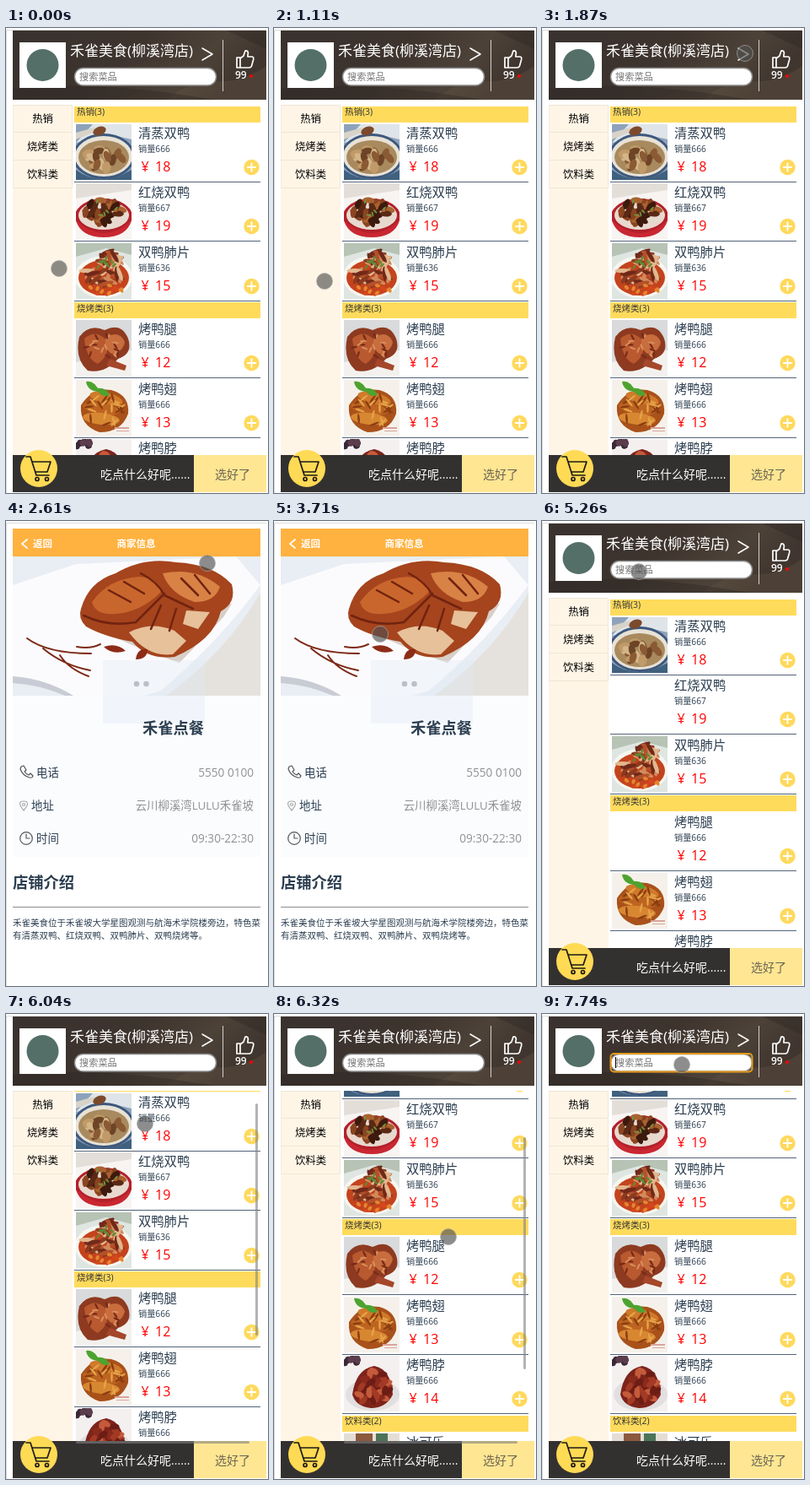
An HTML page for the animation above (8 s loop, 311 by 551 pixels).

```html
<!DOCTYPE html>
<html lang="zh-CN">
<head>
<meta charset="utf-8">
<title>点餐</title>
<style>
html, body { margin: 0; width: 100%; height: 100%; overflow: hidden; background: #fff; }
svg { display: block; }
text { font-family: "Open Sans", "Noto Sans CJK SC", "Noto Sans CJK", sans-serif; fill: #2c3e50; }
.white { fill: #fff; }
.mid { text-anchor: middle; }
.end { text-anchor: end; fill: #919191; font-weight: 500; }
.side { font-size: 12.3px; fill: #000; text-anchor: middle; }
.cat { font-size: 10.5px; fill: #333; }
.dish { font-size: 15.3px; }
.sold { font-size: 10.2px; }
.price { font-size: 16px; fill: #f00; }
.row text { font-size: 13.4px; }
.line { fill: none; stroke-linecap: round; stroke-linejoin: round; }

#cursor, #list, #thumb, #bars, #info, #photo, #status, #focus, .food {
  animation: 8s step-end infinite;
}
#cursor { animation-name: point; }
#list { animation-name: scroll; }
#thumb { animation-name: thumb; }
#bars { animation-name: bars; }
#info { animation-name: info; }
#photo { animation-name: photo; }
#status { animation-name: status; }
#focus { animation-name: focus; }
.food:nth-of-type(1) { animation-name: none; }

@keyframes point {
  0% { transform: translate(63px, 285px); }
  1.5% { transform: translate(25px, 308px); }
  3% { transform: translate(32px, 332px); }
  13.875% { transform: translate(60px, 300px); }
  15.75% { transform: translate(120px, 210px); }
  17.625% { transform: translate(185px, 110px); }
  19.5% { transform: translate(228px, 45px); }
  21.375% { transform: translate(240px, 11px); }
  23.375% { transform: translate(241px, 30px); }
  32.625% { transform: translate(239px, 50px); }
  34.375% { transform: translate(222px, 85px); }
  36.125% { transform: translate(196px, 114px); }
  37.875% { transform: translate(165px, 128px); }
  39.5% { transform: translate(140px, 133px); }
  46.375% { transform: translate(126px, 134px); }
  47.875% { transform: translate(95px, 106px); }
  49.75% { transform: translate(66px, 73px); }
  51.375% { transform: translate(45px, 45px); }
  53.25% { transform: translate(31px, 28px); }
  55.5% { transform: translate(30px, 26px); }
  60.875% { transform: translate(35px, 29px); }
  62.5% { transform: translate(58px, 41px); }
  64.125% { transform: translate(90px, 53px); }
  65.75% { transform: translate(115px, 60px); }
  67.625% { transform: translate(125px, 61px); }
  69.125% { transform: translate(131px, 60px); }
  70.625% { transform: translate(134px, 58px); }
  74% { transform: translate(165px, 130px); }
  75.75% { transform: translate(190px, 200px); }
  77.375% { transform: translate(203px, 245px); }
  79% { transform: translate(207px, 264px); }
  84.375% { transform: translate(206px, 240px); }
  86.125% { transform: translate(202px, 200px); }
  87.875% { transform: translate(196px, 160px); }
  89.625% { transform: translate(188px, 122px); }
  91.375% { transform: translate(180px, 92px); }
  93.125% { transform: translate(173px, 74px); }
  95% { transform: translate(168px, 64px); }
  96.75%, 100% { transform: translate(166px, 60px); }
}
@keyframes scroll {
  0% { transform: translateY(0); }
  74% { transform: translateY(-20px); }
  75.75% { transform: translateY(-50px); }
  77.375% { transform: translateY(-72px); }
  79%, 100% { transform: translateY(-82px); }
}
@keyframes thumb {
  0% { transform: translateY(0); }
  74% { transform: translateY(13px); }
  75.75% { transform: translateY(32px); }
  77.375% { transform: translateY(47px); }
  79%, 100% { transform: translateY(53px); }
}
@keyframes bars {
  0% { opacity: 0; }
  55.5% { opacity: 1; }
  62.5% { opacity: .5; }
  64.125% { opacity: 0; }
  74% { opacity: 1; }
  86.125% { opacity: .5; }
  87.875%, 100% { opacity: 0; }
}
@keyframes info { 0% { opacity: 0; } 28.875% { opacity: 1; } 55.5%, 100% { opacity: 0; } }
@keyframes photo { 0% { opacity: 0; } 32.625%, 100% { opacity: 1; } }
@keyframes status { 0% { opacity: 0; } 55.5% { opacity: 1; } 62.5%, 100% { opacity: 0; } }
@keyframes focus { 0% { opacity: 0; } 95%, 100% { opacity: 1; } }
@keyframes load0 { 0% { opacity: 1; } 55.5% { opacity: 0; } 60.875%, 100% { opacity: 1; } }
@keyframes load1 { 0% { opacity: 1; } 55.5% { opacity: 0; } 67.625%, 100% { opacity: 1; } }
@keyframes load2 { 0% { opacity: 1; } 55.5% { opacity: 0; } 62.5%, 100% { opacity: 1; } }
@keyframes load3 { 0% { opacity: 1; } 55.5% { opacity: 0; } 69.125%, 100% { opacity: 1; } }
@keyframes load4 { 0% { opacity: 1; } 55.5% { opacity: 0; } 64.125%, 100% { opacity: 1; } }
@keyframes load5 { 0% { opacity: 1; } 55.5% { opacity: 0; } 70.625%, 100% { opacity: 1; } }
</style>
</head>
<body>
<svg width="311" height="551" viewBox="0 0 311 551">
  <defs>
    <linearGradient id="wood" x2="1" y2=".25">
      <stop offset="0" stop-color="#39322f"/>
      <stop offset=".5" stop-color="#3e342e"/>
      <stop offset=".8" stop-color="#4d4238"/>
      <stop offset="1" stop-color="#40362f"/>
    </linearGradient>
    <clipPath id="listBox"><path d="M80 91h223v415H80z"/></clipPath>
    <clipPath id="foodBox"><path d="M0 0h66v66H0z"/></clipPath>
    <clipPath id="photoBox"><path d="M8 42h294v165H8z"/></clipPath>
    <clipPath id="headBox"><path d="M8 3h301v82H8z"/></clipPath>
  </defs>

  <!-- menu page -->
  <g clip-path="url(#headBox)">
    <path fill="url(#wood)" d="M8 3h301v82H8z"/>
    <path fill="#6a5a4b" opacity=".3" d="M190 85q30-24 60-22t59-18v40z"/>
    <path fill="#2a2421" opacity=".35" d="M8 72q80-8 180 4l60 9H8zM262 3h47v22z"/>
  </g>
  <path fill="#fff" d="M16 17h55v54H16z"/>
  <circle cx="43.500" cy="44" r="19" fill="#536f68"/>
  <text class="white" x="76" y="33" font-size="17">禾雀美食(柳溪湾店)</text>
  <path class="line" stroke="#fff" stroke-width="1.500" d="M233 24l12 7-12 7"/>
  <rect x="81.500" y="47.500" width="168" height="20.500" rx="10" fill="#fff" stroke="#8b8b8b" stroke-width="1.500"/>
  <text x="87" y="61.500" font-size="11.200" style="fill:#757575">搜索菜品</text>
  <g id="focus">
    <rect x="81.500" y="47" width="168" height="21.500" rx="4" fill="none" stroke="#e59a1c" stroke-width="2"/>
    <path stroke="#000" d="M87.500 51v13"/>
  </g>
  <path stroke="#d5d0cc" d="M257.500 14v61"/>
  <path class="line" stroke="#fff" stroke-width="1.700" d="M274 35h4v12h-4zM278 36l4-3 2-6c3-1 4 2 3 5v2h5c2 0 2 2 1.500 4l-2 7c-.500 1.500-1.500 2-3 2H278"/>
  <text class="white" x="272" y="60" font-size="12" font-weight="600">99</text>
  <circle cx="291" cy="57" r="2" fill="#f00"/>

  <path fill="#fff5e6" d="M8 91h71v415H8z"/>
  <path class="line" stroke="#efe6d6" d="M8.500 91.500h70v32h-70zM8.500 123.500h70v33h-70zM8.500 156.500h70v33h-70z"/>
  <text class="side" x="43.500" y="111.500">热销</text>
  <text class="side" x="43.500" y="144.500">烧烤类</text>
  <text class="side" x="43.500" y="177.500">饮料类</text>
  <g clip-path="url(#listBox)"><g id="list"></g></g>

  <path fill="#333130" d="M8 506h215v44H8z"/>
  <path fill="#ffe692" d="M223 506h86v44h-86z"/>
  <circle cx="39" cy="522" r="22" fill="#ffda55"/>
  <g class="line" stroke="#1d1a14" stroke-width="1.700">
    <path d="M24 508h5l7 22h15M31 514h22l-4 12H35"/>
    <circle cx="37" cy="534.500" r="2"/><circle cx="48.500" cy="534.500" r="2"/>
  </g>
  <text class="white" x="112" y="534" font-size="14" font-weight="500">吃点什么好呢......</text>
  <text x="248" y="534" font-size="14" style="fill:#6c6454">选好了</text>
  <g id="bars" fill="#808080" fill-opacity=".6">
    <rect id="thumb" x="296" y="93" width="3" height="275" rx="1.500"/>
    <rect x="83" y="506" width="206" height="3" rx="1.500"/>
  </g>

  <!-- shop page -->
  <g id="info">
    <path fill="#fff" d="M0 0h311v551H0z"/>
    <path fill="#ffb240" d="M8 9h294v33H8z"/>
    <path class="line" stroke="#fff" stroke-width="1.700" d="M25 22l-6 5 6 5"/>
    <text class="white" x="32" y="30.500" font-size="11.500" font-weight="600">返回</text>
    <text class="white mid" x="154.500" y="30.500" font-size="11.500" font-weight="600">商家信息</text>
    <g id="photo">
      <path fill="#fafcfe" d="M8 207h294v191H8z"/>
      <g clip-path="url(#photoBox)">
        <path fill="#e9edf4" d="M8 42h294v165H8z"/>
        <path fill="#e4dfd4" opacity=".7" d="M302 85v122H190q70-50 112-122z"/>
        <path fill="#fbfbfd" d="M8 76l75-25 190-9 29 34q-50 68-118 125l-20 6H78Q30 188 8 184z"/>
        <path fill="#c9ccd4" d="M8 184q40 3 72 23H70Q40 194 8 192z"/>
        <path fill="#d8cfc9" d="M96 122q60 30 110 46l52-54 10-16z"/>
        <path fill="#a5441d" d="M89 104Q98 72 130 62q34-20 72-13 44 2 66 26 6 22-13 32-8 34-55 54-32 4-50-18-34-6-55-18-10-10-6-21z"/>
        <path fill="#c9662d" d="M102 96q20-28 56-30 24 2 26 18-24 24-54 26-24 2-28-14z"/>
        <path fill="#d98245" d="M186 62q40-8 68 16-6 18-30 18-30-10-38-34z"/>
        <path fill="#e6c19a" d="M146 132q26-14 54-2l14 12-16 16q-30 4-52-26zM214 106l28 2-14 20-18-6z"/>
        <g class="line" stroke="#71230f" stroke-width="2.500">
          <path d="M92 112q30 14 62 8l34-34M160 62q20 10 28 26l34 16M122 82l26 14M140 72l24 14M208 68l20 20M224 64l18 22M184 100l-12 28M202 104l-8 26"/>
        </g>
        <g class="line" stroke="#7d2a17" stroke-width="2">
          <path d="M25 139q24 18 76 18M44 151q24 20 56 26M64 159q10 16 34 25M84 149q16 3 28-3"/>
        </g>
        <path fill="#8d2c17" d="M116 149q16-5 26 5-16 5-26-5zM154 164q2-14 14-12 0 12-14 12z"/>
        <g fill="#a8a9ad"><circle cx="155" cy="193" r="3.300"/><circle cx="166.500" cy="193" r="3.300"/></g>
      </g>
      <path fill="#dfe8f2" opacity=".35" d="M115 165h121v75H115z"/>
    </g>
    <text x="162" y="251.500" font-size="18.300" font-weight="700">禾雀点餐</text>
    <g class="line" stroke="#555" stroke-width="1.200">
      <path d="M18 291l3-1 3 5-2 2q2 3 5 4l2-2 3 3q-1 3-4 2-8-2-11-10z"/>
      <path stroke="#aaa" d="M21 343q-9-11 0-11t0 11z"/><circle stroke="#aaa" cx="21" cy="336" r="1.500"/>
      <circle cx="24" cy="376" r="7.300"/><path d="M24 371v5h4"/>
    </g>
    <g class="row">
      <text x="36" y="302.500">电话</text><text class="end" x="294" y="303" style="font-size:13.600px">5550 0100</text>
      <text x="30" y="342">地址</text><text class="end" x="294" y="342">云川柳溪湾LULU禾雀坡</text>
      <text x="36" y="381">时间</text><text class="end" x="294" y="381" style="font-size:13.600px">09:30-22:30</text>
    </g>
    <text x="8" y="434.500" font-size="18.300" font-weight="700">店铺介绍</text>
    <path stroke="#8c8c8c" d="M8 457.500h294"/>
    <text font-size="10.500"><tspan x="8" y="480">禾雀美食位于禾雀坡大学星图观测与航海术学院楼旁边，特色菜</tspan><tspan x="8" y="494.500">有清蒸双鸭、红烧双鸭、双鸭肺片、双鸭烧烤等。</tspan></text>
  </g>

  <path fill="none" stroke="#dcdcdc" d="M.5 551V2.500H309"/>
  <g id="status">
    <path fill="#f2f3f5" stroke="#d4d6d9" stroke-width=".5" d="M1 550v-21h97q3 0 3 3v18z"/>
    <text x="4" y="544" font-size="12" style="fill:#5a5d61">正在连接...</text>
  </g>
  <circle id="cursor" r="9.500" fill="#505050" fill-opacity=".65" stroke="#aaa" stroke-opacity=".7"/>
</svg>
<script>
let seed = 1;
const rnd = () => (seed = seed * 16807 % 2147483647) / 2147483647;
const path = (fill, d) => `<path fill="${fill}" d="${d}"/>`;
const oval = (fill, x, y, rx, ry, turn = 0) =>
  `<ellipse fill="${fill}" rx="${rx}" ry="${ry}" transform="translate(${x} ${y}) rotate(${turn})"/>`;

// scattered bits inside an ellipse
function bits(start, n, x, y, rx, ry, long, thin, colors) {
  seed = start;
  let out = '';
  for (let i = 0; i < n; i++) {
    const a = rnd() * 6.283, r = Math.sqrt(rnd());
    out += oval(colors[i % colors.length], (x + rx * r * Math.cos(a)).toFixed(1),
      (y + ry * r * Math.sin(a)).toFixed(1), long, thin, Math.round(rnd() * 180));
  }
  return out;
}
const back = fill => path(fill, 'M0 0h66v66H0z');

const foods = [
  back('#8ea3bb') + path('#dfe4e8', 'M0 22L20 0h46v18L40 12z') + oval('#3d587d', 33, 38, 37, 27) +
    oval('#e8e2d6', 33, 38, 34, 24) + oval('#a88a5e', 33, 39, 30, 20) +
    bits(7, 22, 33, 40, 22, 13, 7, 4, ['#8a5a34', '#c09a68', '#6d4426', '#d3b588']) +
    path('#40617f', 'M0 54q30 22 66 0v12H0z') + oval('#7c4a2b', 28, 8, 8, 5, -20) + path('#d8d3c8', 'M0 10l22-6-2 6L0 18z'),
  back('#f7f4f2') + path('#e4ded9', 'M0 0h66v8L0 18z') + oval('#b3202a', 33, 39, 34, 21) + oval('#e8d9cf', 33, 38, 30, 17) +
    bits(31, 36, 33, 33, 22, 14, 7, 3.5, ['#5a2915', '#8a4420', '#3d1a0e', '#a9622f']) +
    bits(5, 5, 33, 30, 18, 10, 3, 1, ['#6f9440']) + path('#c92731', 'M0 44q33 30 66 0-6 20-33 20T0 44z'),
  back('#dfe6e2') + path('#b7c3b5', 'M0 0h66v14L36 6 0 16z') + oval('#f7f6f0', 33, 40, 34, 25) + oval('#c4431d', 33, 41, 30, 21) +
    bits(19, 46, 33, 32, 21, 22, 9, 2.5, ['#8c3a1f', '#d08a5c', '#b4512a', '#e2b78e', '#70291a']) +
    bits(3, 8, 34, 22, 14, 12, 3, 1.3, ['#5f8c36']) + bits(11, 14, 33, 54, 24, 7, 3, 2, ['#d6471c', '#e5862f']),
  back('#d9dadb') + path('#f3f1ee', 'M0 50l66-14v30H0z') +
    path('#8e3a20', 'M4 20Q16 4 34 12q20-10 28 10 6 18-12 24-16 18-36 14-16-14-10-40z') +
    path('#b9592f', 'M10 22q14-12 26 2 6 16-10 28-14-6-16-30z') + path('#c86d3e', 'M36 20q16-8 22 6-2 12-16 14-10-8-6-20z') +
    bits(23, 18, 32, 32, 22, 18, 4, 1.2, ['#d98c5a', '#772a18']) + path('#a5472a', 'M40 46l20 8-2 6-22-6z'),
  back('#f5f1ea') + path('#a9511a', 'M6 30Q20 8 42 12q22 6 20 28-8 22-34 22Q4 54 6 30z') +
    oval('#d07a2a', 36, 22, 20, 7, 14) + oval('#bd6420', 30, 34, 22, 7, 10) + oval('#d88731', 30, 46, 22, 7, 6) +
    bits(13, 22, 33, 36, 22, 18, 6, 1.3, ['#8b3d12', '#e5a34a']) + path('#4da32f', 'M12 2q10-2 16 12-14 0-16-12zM24 10q12-2 16 8-10 4-16-8z') +
    path('#d9a49b', 'M46 56h17v2H46zM48 60h15v1H48z'),
  back('#f3f0ef') + bits(17, 9, 9, 5, 11, 5, 4, 4, ['#3a2836', '#5b3d4d']) + oval('#e2dfe0', 34, 46, 32, 19) +
    path('#7d231a', 'M10 46Q14 16 36 12q20 4 22 34-8 16-26 16-18-2-22-16z') +
    bits(29, 38, 34, 37, 20, 20, 6, 3.5, ['#a33a25', '#6c1d15', '#c45b3b', '#8a2a1d']),
  back('#e4ddd5') + path('#8b5a3e', 'M14 0h20v66H14z') + path('#4c7458', 'M38 0h14v66H38z')
];

const menu = [
  ['热销(3)', ['清蒸双鸭', 666, 18], ['红烧双鸭', 667, 19], ['双鸭肺片', 636, 15]],
  ['烧烤类(3)', ['烤鸭腿', 666, 12], ['烤鸭翅', 666, 13], ['烤鸭脖', 666, 14]],
  ['饮料类(2)', ['冰可乐', 666, 3]]
];

let top0 = 91, n = 0, html = '';
for (const [title, ...dishes] of menu) {
  html += path('#ffdb5c', `M81 ${Math.round(top0 + 2)}h221v19H81z`) +
    `<text class="cat" x="84" y="${top0 + 12.4}">${title}</text>`;
  top0 += 21.2;
  for (const [name, sold, price] of dishes) {
    const y = Math.floor(top0);
    html += `<g transform="translate(83 ${y + 2})"><g class="food" clip-path="url(#foodBox)" style="animation-name:load${Math.min(n, 5)}">${foods[n]}</g></g>
      <text class="dish" x="157" y="${y + 18.4}">${name}</text>
      <text class="sold" x="157" y="${y + 35.2}">销量${sold}</text>
      <text class="price" x="160.500" y="${y + 58}">¥</text><text class="price" x="177" y="${y + 58}">${price}</text>
      <circle cx="291.500" cy="${y + 53}" r="9.200" fill="#ffd95c"/>
      <path stroke="#fff" stroke-width="1.800" d="M286 ${y + 53}h11M291.500 ${y + 47.5}v11"/>
      <path stroke="#536379" d="M81 ${y + 70.5}h221"/>`;
    top0 += 70.4;
    n++;
  }
}
document.getElementById('list').innerHTML = html;
</script>
</body>
</html>
```
